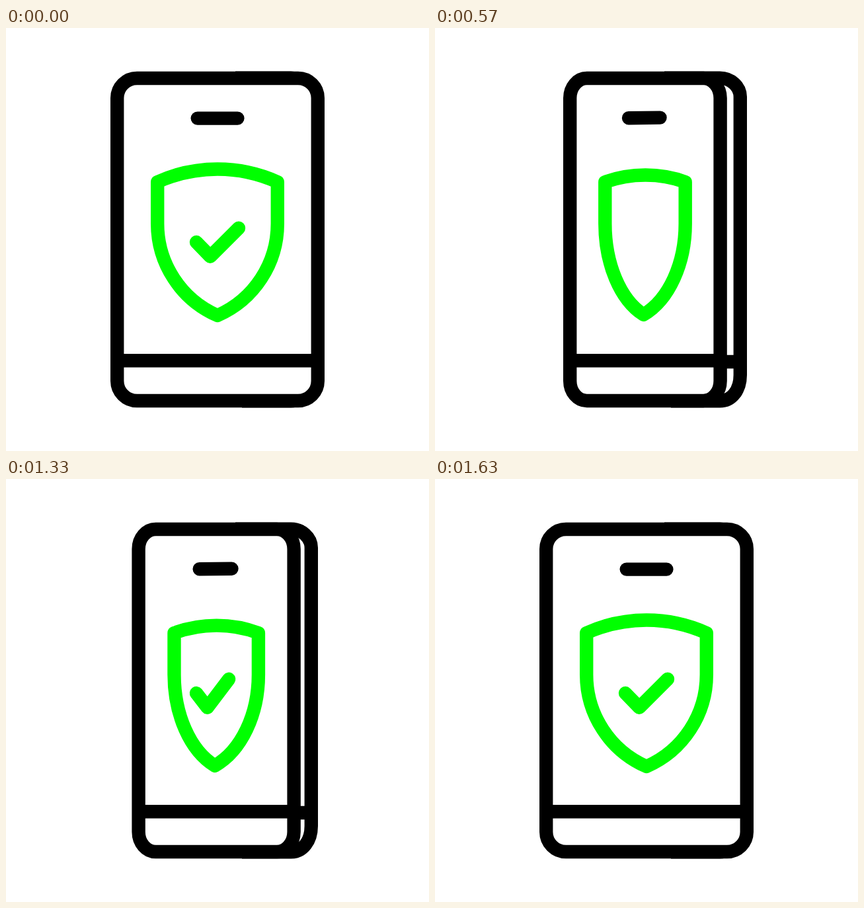
An HTML page that plays this animation: 640x640 px, repeating every 1670 ms.

```html
<!DOCTYPE html>
<html lang="en">
<head>
<meta charset="utf-8">
<title>Protected phone</title>
<style>
  html, body { margin: 0; width: 100%; height: 100%; overflow: hidden; background: #fff; }
  svg { display: block; width: 100vw; height: 100vh; }

  path { fill: none; stroke: #000; stroke-width: 20.4; stroke-linejoin: round; }
  .round { stroke-linecap: round; }
  .green { stroke: #0f0; }

  /* 50 ticks per loop: one tick is 2% */
  .turn { d: var(--flat); animation: turn 1670ms -8ms infinite; }
  .check { stroke-dasharray: 1 3; animation: turn 1670ms -8ms infinite, draw 1670ms -8ms infinite; }
  .spark { visibility: hidden; animation: burst 1670ms -8ms infinite; }

  .front {
    --flat: path("M198.2 76H441.8A30 30 0 0 1 471.8 106V534A30 30 0 0 1 441.8 564H198.2A30 30 0 0 1 168.2 534V106A30 30 0 0 1 198.2 76Z");
    --tilt: path("M229.7 76H406.1A25.5 30 0 0 1 431.6 106V534A25.5 30 0 0 1 406.1 564H229.7A25.5 30 0 0 1 204.2 534V106A25.5 30 0 0 1 229.7 76Z");
    fill: #fff;
  }
  .bar {
    --flat: path("M168.2 503.3H471.8");
    --tilt: path("M204.2 503.3H431.6");
  }
  .speaker {
    --flat: path("M289.7 136.6L350.4 136.6");
    --tilt: path("M293 136.2L340.5 135.6");
  }
  .shield {
    --flat: path("M229.2 233C287 207 353 207 410.8 233V296C410.8 356.3 375.2 410.8 320 435C264.8 410.8 229.2 356.3 229.2 296Z");
    --tilt: path("M257.3 233C296 219 341 219 378.7 233V296C378.7 356.3 354 411 315.5 433.7C280 411 257.3 356.3 257.3 296Z");
  }
  .check {
    --flat: path("M288 324L309 345.7L352 302.8");
    --tilt: path("M288 324L304.3 345.7L335.5 302.8");
  }

  @keyframes turn {
    0% { d: var(--flat); animation-timing-function: steps(11); }
    22% { d: var(--tilt); }
    78% { d: var(--tilt); animation-timing-function: steps(10); }
    98%, 100% { d: var(--flat); }
  }
  @keyframes draw {
    0% { stroke-dashoffset: 0; }
    12% { stroke-dashoffset: 0; animation-timing-function: steps(10); }
    32% { stroke-dashoffset: .999; animation-timing-function: step-end; }
    34% { stroke-dashoffset: 1.05; }
    46% { stroke-dashoffset: 1.05; animation-timing-function: steps(10); }
    66%, 100% { stroke-dashoffset: 0; }
  }
  @keyframes burst {
    0% { visibility: hidden; stroke-dasharray: 0 3; stroke-dashoffset: 0; }
    54% { visibility: hidden; stroke-dasharray: 0 3; stroke-dashoffset: 0; animation-timing-function: steps(3); }
    60% { visibility: visible; stroke-dasharray: .45 3; stroke-dashoffset: 0; animation-timing-function: steps(3); }
    66% { visibility: visible; stroke-dasharray: .4 3; stroke-dashoffset: -.6; animation-timing-function: steps(2); }
    70%, 100% { visibility: hidden; stroke-dasharray: 0 3; stroke-dashoffset: -1; }
  }
</style>
</head>
<body>
<svg viewBox="0 0 640 640">
  <!-- back of the phone -->
  <path d="M347 75.6H431C447 75.6 461.8 88 461.8 104V525C461.8 548 449 564.4 431 564.4H357"/>
  <path d="M400 505H461.8"/>

  <path class="turn front"/>
  <path class="turn bar"/>
  <path class="turn speaker round"/>
  <path class="turn shield green"/>
  <path class="turn check green round" pathLength="1"/>

  <path class="spark green round" pathLength="1" d="M192 260L141 226.5"/>
  <path class="spark green round" pathLength="1" d="M194 296L133 296.3"/>
  <path class="spark green round" pathLength="1" d="M195 336.5L137.5 357"/>
</svg>
</body>
</html>
```
